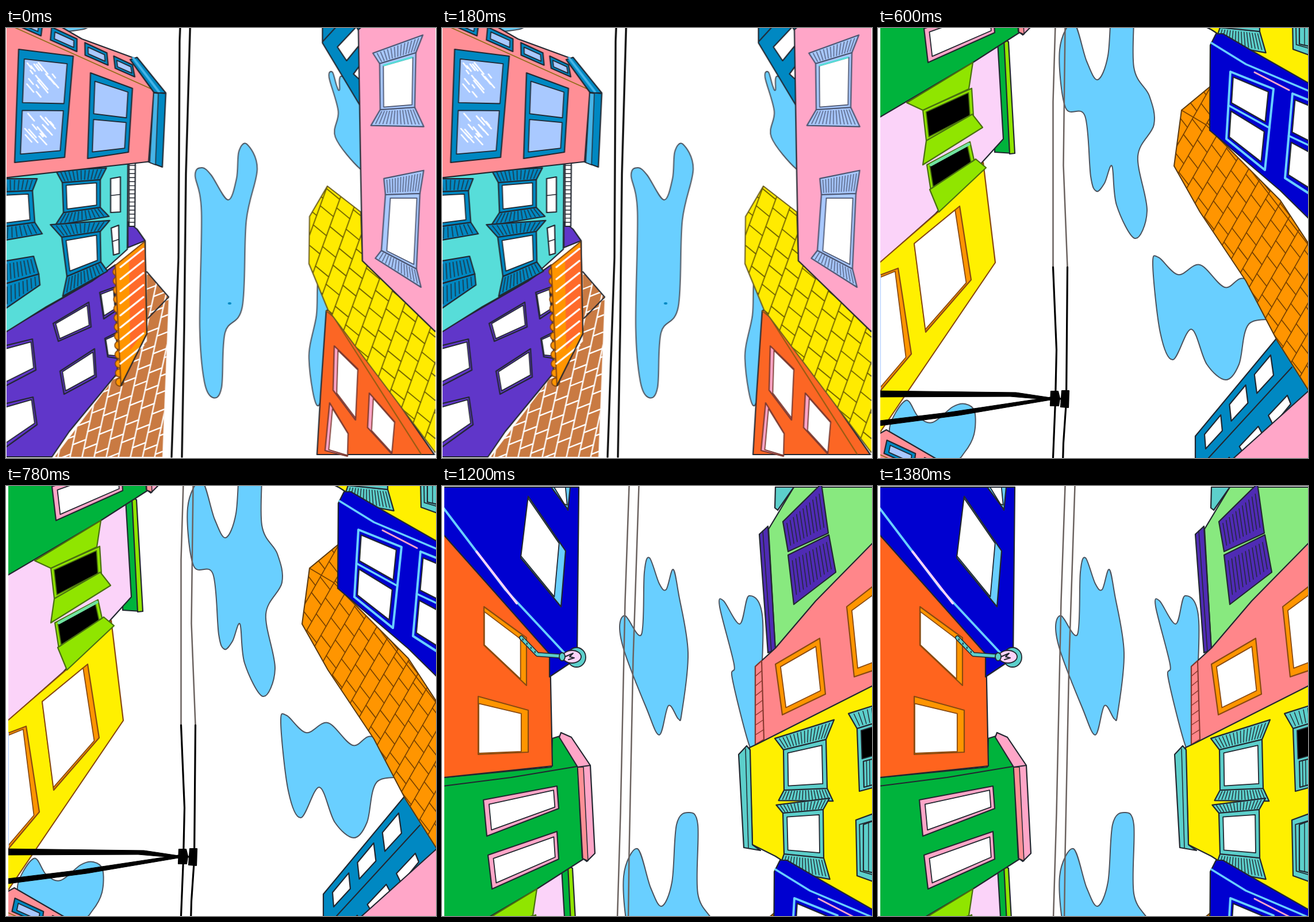
These frames come from a looping animation (748 by 748 pixels, 1.5 s). An HTML page with a canvas:

```html
<!DOCTYPE html>
<html>
<head>
<meta charset="utf-8">
<title>Street scroll</title>
<style>
html, body { margin: 0; width: 100%; height: 100%; overflow: hidden; background: #fff; }
canvas { display: block; }
</style>
</head>
<body>
<canvas id="stage" width="748" height="748"></canvas>
<script>
const SIZE = 748, HOLD = 300;
const stops = [0, 227, 749, 1071, 1390];
const TOP = stops[4];
const shift = i => i ? 0 : -1.5;
const margin = i => Math.min(4, 1 + i * 1.5);

const INK = '#222730', CLOUD = '#69cfff', BLUE = '#0088c2', GLASS = '#a9c9ff', TEAL = '#57ddd9',
  AQUA = '#5ccfcb', PURPLE = '#6036c9', VIOLET = '#4f2bb4', ORANGE = '#ff9500', RUST = '#fc6624',
  SALMON = '#ff8f96', PINK = '#ffa6c8', NAVY = '#0000d0', GREEN = '#00b33c', LIME = '#90e500',
  LILAC = '#fbd3f9', YELLOW = '#fff000', WHITE = '#fff', BLACK = '#000', BROWN = '#8a4a10', GREY = '#6b625f';

const scene = document.createElement('canvas');
scene.width = SIZE;
scene.height = SIZE + TOP;
const g = scene.getContext('2d');
g.fillStyle = WHITE;
g.fillRect(0, 0, SIZE, SIZE + TOP);
g.lineJoin = g.lineCap = 'round';

let seed = 7;
const random = () => (seed = seed * 16807 % 2147483647) / 2147483647;

// Each section is drawn in the coordinates of the stop that shows it best
const at = i => g.setTransform(1, 0, 0, 1, -shift(i), TOP - stops[i]);
const points = s => typeof s === 'string' ? s.split(' ').map(p => p.split(',').map(Number)) : s;
const mix = (a, b, k) => [a[0] + (b[0] - a[0]) * k, a[1] + (b[1] - a[1]) * k];

// Place inside (or beyond) a quad given clockwise from its top left
const spot = ([a, b, c, d], u, v) => mix(mix(a, b, u), mix(d, c, u), v);
const part = (q, [l, t, r, b]) => [spot(q, l, t), spot(q, r, t), spot(q, r, b), spot(q, l, b)];
const hood = (q, h, f) => [spot(q, -f, -h), spot(q, 1 + f, -h), q[1], q[0]];
const sill = (q, h, f) => [q[3], q[2], spot(q, 1 + f, 1 + h), spot(q, -f, 1 + h)];

function trace(list) {
  g.beginPath();
  list.forEach(p => g.lineTo(...p));
}
function ink(color, width) {
  g.strokeStyle = color;
  g.lineWidth = width;
  g.stroke();
}
function paint(fill, color, width) {
  g.fillStyle = fill;
  g.fill();
  if (color) ink(color, width);
}
function line(s, color = INK, width = 2) {
  trace(points(s));
  ink(color, width);
}
function poly(fill, s, color = INK, width = 2.2) {
  trace(points(s));
  g.closePath();
  paint(fill, color, width);
}
function disc(x, y, rx, ry, fill, color = INK) {
  g.beginPath();
  g.ellipse(x, y, rx, ry, 0, 0, 7);
  paint(fill, color, 1.8);
}
// Smooth closed curve through a few key points
function cloud(s) {
  const p = points(s), n = p.length;
  g.beginPath();
  g.moveTo(...p[0]);
  for (let i = 0; i < n; i++) {
    const [a, b, c, d] = [n - 1, 0, 1, 2].map(k => p[(i + k) % n]);
    g.bezierCurveTo(b[0] + (c[0] - a[0]) / 6, b[1] + (c[1] - a[1]) / 6,
      c[0] - (d[0] - b[0]) / 6, c[1] - (d[1] - b[1]) / 6, ...c);
  }
  paint(CLOUD, '#4c535e', 2);
}
// Quad with strokes running from its first edge to the opposite one
function slats(fill, s, n, pad = 0.15, color = INK) {
  const q = points(s);
  poly(fill, q, color);
  for (let i = 1; i < n; i++) line([spot(q, i / n, pad), spot(q, i / n, 1 - pad)], color, 1.4);
}
function pane(frame, s, { hole = [0.1, 0.1, 0.9, 0.9], glass = WHITE, color = INK, over, under, n = 12 } = {}) {
  const q = points(s);
  if (over) slats(frame, hood(q, ...over), n, 0.12, color);
  if (under) slats(frame, sill(q, ...under), n, 0.12, color);
  poly(frame, q, color);
  poly(glass, part(q, hole), color, 1.8);
}
function sash(frame, s, glass, shine = 0) {
  const q = points(s);
  poly(frame, q);
  for (const t of [0.08, 0.54]) {
    const w = part(q, [0.11, t, 0.9, t + 0.39]);
    poly(glass, w, INK, 1.8);
    for (let i = 0; i < shine; i++) {
      const u = random() * 0.65, v = random() * 0.7, k = 0.1 + random() * 0.2;
      line([spot(w, u + 0.05, v + 0.04), spot(w, u + k, v + k)], WHITE, 2.5);
    }
  }
}
// n panes along a strip, drawing closer together by bend
function row(strip, n, fill, bend, draw) {
  const q = points(strip), ease = t => t + bend * t * (1 - t), end = n - 1 + fill;
  for (let i = 0; i < n; i++) draw(part(q, [ease(i / end), 0, ease((i + fill) / end), 1]));
}
// Courses along v, stepped by u, with joints staggered by half
function bricks(fill, s, u, v, mortar, width, edge) {
  const list = points(s), [ox, oy] = list[0];
  const place = (i, j) => [ox + i * u[0] + j * v[0], oy + i * u[1] + j * v[1]];
  poly(fill, list, null);
  g.save();
  g.clip();
  for (let i = -25; i < 25; i++) {
    line([place(i, -25), place(i, 25)], mortar, width);
    for (let j = -25; j < 25; j++) {
      const k = j + (i & 1) / 2 + random() * 0.15;
      line([place(i, k), place(i + 1, k)], mortar, width);
    }
  }
  g.restore();
  trace([...list, list[0]]);
  if (edge) ink(edge, 2);
}

function clouds() {
  at(0);
  cloud('329,256 341,243 357,256 386,299 401,262 405,215 419,202 437,245 418,335 411,485 381,530 375,625 360,643 345,615 337,520 340,320');
  disc(389, 479, 3, 2, BLUE, null);
  cloud('562,86 568,77 575,100 580,108 586,85 640,150 640,250 616,245 573,190 578,145');
  cloud('545,435 540,500 527,575 545,655 575,480');
  at(1);
  cloud('20,180 48,126 70,154 95,164 130,137 152,132 168,145 167,185 150,217 131,230 60,230');
  at(2);
  cloud('478,412 488,399 522,429 560,412 603,451 640,437 700,500 645,515 628,585 605,612 572,585 545,524 513,577 491,530');
  at(3);
  cloud('340,312 316,360 326,460 360,475 370,580 380,606 394,592 407,562 415,630 447,688 468,640 452,545 480,490 472,440 445,390 445,270 428,249 408,270 400,370 382,412 363,380');
  at(4);
  cloud('347,258 352,150 361,125 378,170 390,180 402,145 412,190 428,290 417,395 411,405 394,382 378,433 355,385 318,290 309,245 319,226');
  cloud('483,210 490,200 518,240 534,191 558,235 548,440 536,455 505,335 508,310');
}

function leftLow() {
  at(0);
  bricks('#c97a42', '245,424 283,468 272,746 85,746 195,600 245,545', [23, -9], [-7, 32], WHITE, 2.4);
  line('247,505 283,468 245,424');
  poly(PURPLE, '212,337 228,350 242,370 212,382');
  slats(WHITE, '214,232 214,345 224,345 225,232', 16, 0);
  poly(PURPLE, '-5,530 150,440 190,412 194,600 110,702 80,746 -5,746');
  ['82,514 144,477 148,520 91,545', '94,597 154,558 157,607 101,637', '-15,556 46,541 52,595 -15,630',
    '-15,657 47,642 54,690 -15,740', '163,460 188,451 191,492 170,506', '172,540 192,530 196,575 177,572']
    .forEach(q => pane(PURPLE, q, { hole: [0.06, 0.08, 0.95, 0.9] }));

  poly(TEAL, '-5,260 212,232 211,385 150,440 70,485 -5,532');
  pane(BLUE, '-30,286 46,283 50,338 -30,349', { over: [0.38, 0.13], under: [0.4, 0.14] });
  pane(BLUE, '98,269 164,264 164,312 100,321', { over: [0.42, 0.16], under: [0.38, 0.24] });
  pane(BLUE, '97,364 164,354 165,407 106,432', { over: [0.34, 0.24], under: [0.42, 0.2] });
  slats(BLUE, '-5,406 48,397 57,428 -5,446', 9);
  slats(BLUE, '-5,446 57,428 59,447 -5,491', 9);
  slats(WHITE, '182,262 182,321 199,320 199,259', 2, 0);
  slats(WHITE, '183,348 187,395 197,392 196,343', 2, 0);

  // striped awning
  for (let y = 424; y < 620; y += 16) disc(193 + (y - 424) / 40, y, 7, 7, ORANGE, BROWN);
  poly(ORANGE, '190,413 242,371 245,532 200,622', BROWN);
  poly('#ff6a2a', '214,400 241,380 243,525 216,560', null);
  for (let y = 416; y < 590; y += 21) line([[199, y], [239, y - 32]], WHITE, 3.2);
  line('242,371 245,532 200,622');

  poly(SALMON, '-5,-40 13,-50 132,19 222,52 258,106 253,232 -5,261');
  line('-5,-10 115,44 255,107', '#8a6a10', 1.5);
  row('14,-32 220,64 224,85 9,-9', 4, 0.75, 0.26, q => pane(BLUE, q, { glass: GLASS, hole: [0.14, 0.25, 0.88, 0.78] }));
  sash(BLUE, '22,37 117,49 102,225 15,234', GLASS, 18);
  sash(BLUE, '147,78 220,105 213,216 142,227', GLASS);
  poly(BLUE, '216,55 228,51 278,113 258,113');
  line('221,52 266,111', '#46b5e8', 4);
  poly(BLUE, '257,112 278,114 272,242 248,233');
  poly('#46b5e8', '257,113 265,114 260,238 250,234', INK, 1.5);
}

function rightLow() {
  at(1);
  poly(BLUE, '694,17 760,97 760,115 630,220 618,363 552,253 552,188');
  line('552,251 720,68');
  const white = q => poly(WHITE, q);
  row('568,185 683,47 688,82 570,210', 3, 0.65, 0, white);
  row('578,260 712,117 718,132 594,284', 3, 0.65, 0, white);
  white('606,307 620,288 622,322');
  at(0);
  poly(RUST, '567,486 745,742 541,742 547,640 557,492');
  line('557,492 570,503 722,741', '#8a5a10');
  ['571,553 612,593 608,682 569,630', '632,635 676,685 671,741 629,695', '563,652 595,705 594,745 555,735']
    .forEach(q => pane(PINK, q, { hole: [0.16, 0.02, 1, 0.96], color: '#7a3a30' }));
  bricks('#ffeb00', '559,275 617,320 620,405 760,541 760,756 560,490 527,410 528,328', [23, 19], [-12, 33], '#6a5c00', 1.8, '#6a5c20');
  poly(PINK, '613,3 760,-129 760,541 620,405 617,250');
  const trim = { color: '#4b5570', n: 14 };
  pane(GLASS, '650,62 713,43 711,138 651,142', { ...trim, over: [0.28, 0.18], under: [0.35, 0.28], hole: [0.1, 0.07, 0.92, 0.95] });
  line('657,65 706,51', TEAL, 3);
  pane(GLASS, '660,290 720,288 714,419 653,387', { ...trim, over: [0.3, 0.08], under: [0.2, 0.15], hole: [0.15, 0.06, 0.92, 0.96] });
}

function leftHigh() {
  at(3);
  poly(GREEN, '205,352 222,340 235,540 203,538');
  poly(LIME, '219,341 227,346 238,540 229,541');
  poly(LILAC, '-5,480 165,380 208,345 218,515 100,645 -5,738');
  at(2);
  poly(YELLOW, '-5,415 108,317 183,234 204,408 128,520 -5,716', BROWN);
  pane(ORANGE, '63,375 142,310 162,438 83,529', { hole: [0, 0, 0.9, 0.97], color: BROWN });
  pane(ORANGE, '-5,433 35,418 58,567 -5,642', { hole: [0, 0.02, 0.86, 0.97], color: BROWN });
  line('3,430 3,628', GLASS, 4);
  at(3);
  poly(GREEN, '-5,189 190,170 192,120 205,116 236,168 246,330 165,382 -5,482');
  line('-5,204 120,188 240,168');
  poly(PINK, '207,110 225,118 258,167 266,320 252,334 244,328 236,170 204,118');
  poly(SALMON, '236,170 246,170 254,333 245,329', INK, 1.5);
  line('236,170 258,167');
  for (const q of ['72,227 200,203 203,242 78,290', '80,323 200,282 203,330 87,382'])
    pane(PINK, q, { hole: [0.07, 0.15, 0.95, 0.88] });

  const leaf = '#4a7010', dark = { glass: BLACK, color: leaf, hole: [0.06, 0.1, 0.93, 0.92] };
  pane(LIME, '78,465 163,427 166,475 84,518', dark);
  poly(LIME, '50,452 165,382 158,428 78,465', leaf);
  poly(LIME, '84,518 164,472 182,495 78,560', leaf);
  pane(LIME, '85,560 160,520 168,556 92,605', dark);
  line('92,560 158,524', '#6fe3a0', 5);
  poly(LIME, '90,603 170,550 188,565 106,642', leaf);

  at(4);
  poly('#ff641e', '-5,76 188,292 192,487 -5,508');
  poly(NAVY, '-5,2 238,2 235,300 187,332 187,292 -5,76');
  line('0,35 110,180 220,298', CLOUD, 4);
  line('60,114 130,204', LILAC, 4);
  pane(CLOUD, '150,18 215,113 207,210 137,125', { hole: [0, 0.03, 0.83, 0.97] });
  pane(CLOUD, '190,2 223,2 219,42 217,38', { hole: [0.15, 0, 0.75, 0.8] });
  for (const q of ['73,210 147,264 147,347 73,277', '63,366 150,390 150,463 63,467'])
    pane(ORANGE, q, { hole: [0.01, 0.12, 0.86, 0.98], color: BROWN });
  // street lamp
  const arm = '138,264 166,293 208,296';
  line(arm, INK, 8);
  line(arm, AQUA, 5);
  for (let k = 0.1; k < 0.9; k += 0.25) disc(...mix([138, 264], [166, 293], k), 1, 2, INK, null);
  disc(234, 298, 16, 17, AQUA);
  disc(226, 297, 16, 11, LILAC);
  disc(209, 297, 5, 7, AQUA);
  line('214,297 228,291 222,297 230,299 220,302');
}

function rightHigh() {
  at(4);
  poly('#88e97f', '568,75 612,2 760,2 760,140 580,290');
  poly(AQUA, '580,2 612,2 584,42 579,38');
  poly(VIOLET, '552,84 567,70 580,285 567,290');
  line('558,78 573,288', INK, 1.5);
  slats(VIOLET, '593,62 660,-4 672,82 602,114', 12);
  slats(VIOLET, '602,120 673,85 685,150 612,206', 12);
  poly('#ff868a', '545,314 580,282 650,200 760,88 760,380 545,455');
  slats('#ff868a', '545,314 545,450 560,441 556,304', 8, 0, '#8a3a30');
  for (const q of ['580,310 657,265 667,362 592,398', '704,210 781,150 791,307 717,332'])
    pane(ORANGE, q, { color: BROWN });

  at(3);
  poly(YELLOW, '535,136 548,130 760,23 760,430 665,380 580,325 540,305');
  poly(AQUA, '516,148 530,133 536,140 540,305 554,315 525,310');
  line('528,138 533,311', INK, 1.5);
  pane(AQUA, '594,140 668,122 670,207 595,210', { over: [0.35, 0.2], under: [0.26, 0.13], n: 16 });
  pane(AQUA, '593,250 663,244 664,328 595,321', { over: [0.22, 0.16], under: [0.42, 0.15], n: 15 });
  pane(AQUA, '722,103 790,82 790,195 726,212', { over: [0.28, 0.2], glass: BLACK, hole: [0.1, 0.05, 1, 0.5] });
  slats(AQUA, '733,160 760,153 760,198 734,205', 5, 0);
  pane(AQUA, '720,262 780,240 780,380 722,359', { glass: AQUA });
  slats(AQUA, '733,270 760,260 760,356 733,350', 3, 0);

  at(2);
  bricks(ORANGE, '580,100 528,143 515,240 560,320 640,440 695,545 760,648 760,392 700,300 579,178', [17, 22], [-16, 28], '#7a4200', 1.7, '#5a3a10');
  line('528,143 570,168 650,250 760,392', '#7a4200', 1.7);
  at(3);
  poly(NAVY, '588,332 578,352 577,500 700,605 760,664 760,424 665,370 600,332');
  line('580,348 640,385 760,436', CLOUD, 3.5);
  line('655,399 715,430', PINK, 3);
  for (const s of ['613,398 688,428 673,569 606,515', '721,436 796,466 781,630 708,583']) {
    const q = points(s);
    poly(NAVY, q, CLOUD, 4);
    line([spot(q, 0, 0.5), spot(q, 1, 0.48)], CLOUD, 3.5);
    for (const t of [0.06, 0.56]) poly(WHITE, part(q, [0.07, t, 0.89, t + 0.38]));
  }
}

function wires() {
  at(0);
  line('324,-1390 317,-1190 309,-821 303,-621 303,-333', GREY, 2.5);
  line('341,-1390 331,-1090 324,-750 321,-510 328,-333', GREY, 2.5);
  line('303,-333 309,-189 307,-100 302,23 300,400 288,746', BLACK, 3.2);
  line('328,-333 326,-100 321,-27 313,253 310,521 306,746', BLACK, 3.2);
  at(1);
  poly(BLACK, '-5,109 240,112 300,121 300,125 230,119 -5,120', BLACK, 1);
  poly(BLACK, '-5,162 120,147 300,120 300,125 140,152 -5,171', BLACK, 1);
  poly(BLACK, '301,110 313,110 316,122 314,135 300,135', BLACK);
  poly(BLACK, '320,109 332,109 331,138 318,137', BLACK);
  line('312,123 322,123', BLACK, 3);
}

[clouds, leftLow, rightLow, leftHigh, rightHigh, wires].forEach(draw => draw());

const view = document.getElementById('stage').getContext('2d');
function show() {
  const i = Math.floor(performance.now() / HOLD) % stops.length;
  view.fillStyle = WHITE;
  view.fillRect(0, 0, SIZE, SIZE);
  view.drawImage(scene, shift(i), stops[i] - TOP);
  view.fillRect(0, 0, margin(i), SIZE);
  requestAnimationFrame(show);
}
show();
</script>
</body>
</html>
```
